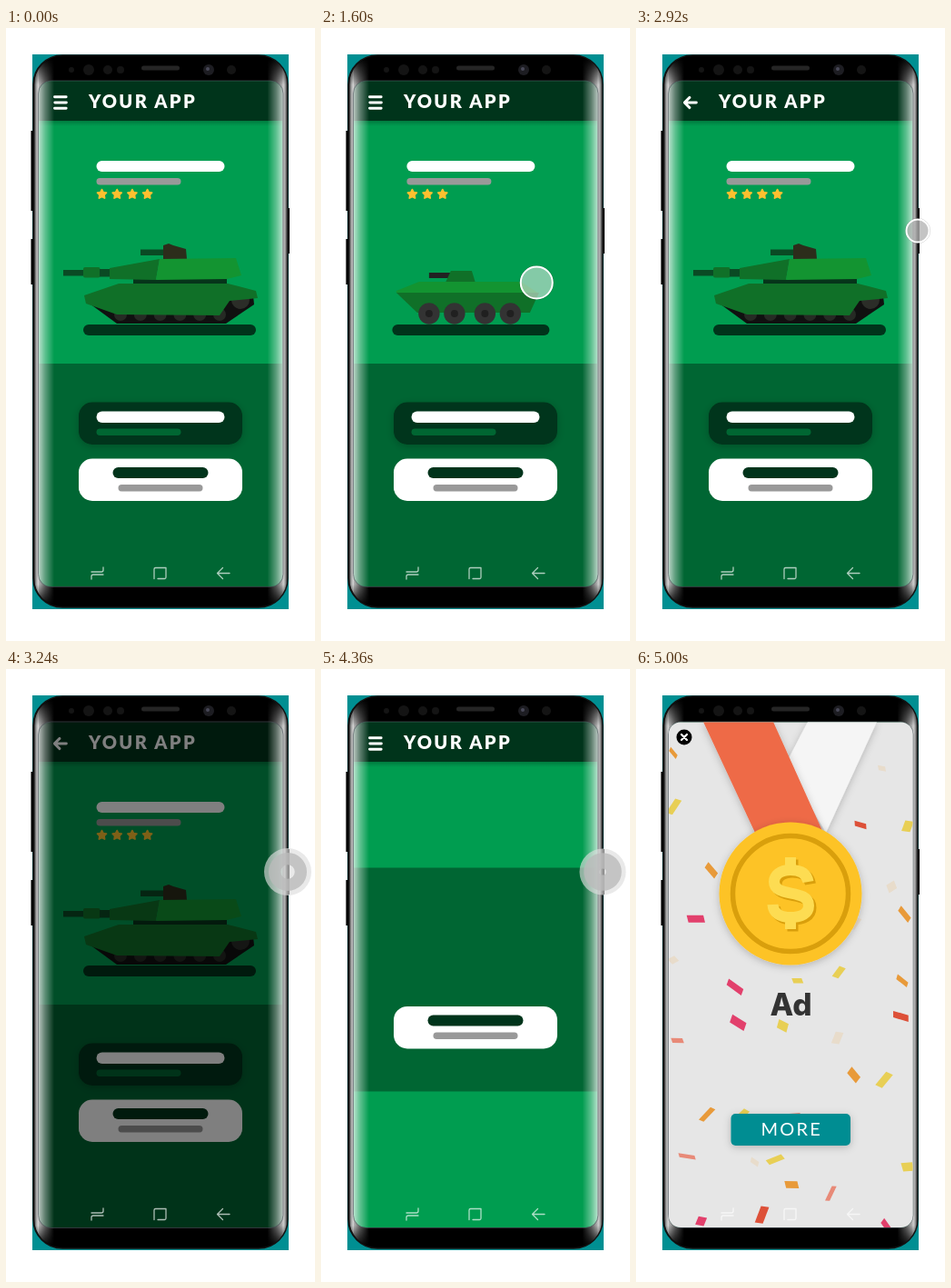
Write an HTML page that moves like this. It is 340 px wide and 674 px high and loops after 8000 ms.

```html
<!DOCTYPE html>
<html lang="en">
<head>
<meta charset="utf-8">
<title>App demo</title>
<style>
  html, body { margin: 0; width: 100%; height: 100%; overflow: hidden; background: #fff; }
  svg { display: block; width: 340px; height: 674px; }
  .title { font: 900 20px Lato, sans-serif; letter-spacing: 2.3px; fill: #fff; }
  .line { fill: none; stroke: #fff; stroke-linecap: round; stroke-linejoin: round; }
</style>
</head>
<body>
<svg viewBox="0 0 340 674">
  <defs>
    <clipPath id="screen"><rect x="36" y="58.5" width="268.5" height="555.5" rx="13"/></clipPath>
    <clipPath id="body"><rect x="31" y="31" width="278.5" height="605" rx="31"/></clipPath>
    <linearGradient id="glow">
      <stop offset="0" stop-color="#fff" stop-opacity=".72"/>
      <stop offset=".4" stop-color="#fff" stop-opacity=".38"/>
      <stop offset="1" stop-color="#fff" stop-opacity="0"/>
    </linearGradient>
    <linearGradient id="rim">
      <stop offset="0" stop-color="#222"/>
      <stop offset=".4" stop-color="#999"/>
      <stop offset="1" stop-color="#ddd"/>
    </linearGradient>
    <linearGradient id="ends" x2="0" y2="1">
      <stop offset="0" stop-color="#000"/>
      <stop offset=".05" stop-color="#fff"/>
      <stop offset=".96" stop-color="#fff"/>
      <stop offset="1" stop-color="#000"/>
    </linearGradient>
    <mask id="fade"><rect x="28" y="32" width="284" height="604" fill="url(#ends)"/></mask>
    <linearGradient id="shade" x2="0" y2="1">
      <stop offset="0" stop-opacity=".22"/>
      <stop offset="1" stop-opacity="0"/>
    </linearGradient>
    <filter id="soft" x="-20%" y="-30%" width="140%" height="170%">
      <feDropShadow dx="0" dy="2" stdDeviation="4" flood-opacity=".22"/>
    </filter>
    <g id="side">
      <rect x="31" y="34" width="5" height="602" fill="url(#rim)"/>
      <rect x="36" y="34" width="17" height="602" fill="url(#glow)"/>
    </g>
    <path id="dollar" fill="none" stroke-width="12" d="M189.500 234C188 225 181 221 170 221C158 221 152 227 152 234
      C152 252 190 241 190 260C190 269 182 273 170 273C158 273 151 268 150.500 259M170 207V222M170 272V286"/>
  </defs>

  <rect x="29" y="29" width="282" height="610" fill="#008f92"/>
  <path d="M27.5 113h3v88h-3zM27.5 232h3v50h-3zM309 198h3v50h-3z"/>
  <rect x="30" y="30" width="280" height="607" rx="32" stroke="#111" stroke-width="1.5"/>
  <rect x="149" y="41.5" width="42" height="5" rx="2.5" fill="#252525"/>
  <g fill="#141414">
    <circle cx="72" cy="46" r="3"/><circle cx="91" cy="46" r="6"/><circle cx="112" cy="46" r="5"/>
    <circle cx="126" cy="46" r="4"/><circle cx="248" cy="46" r="5"/><circle cx="223" cy="46" r="6" fill="#1d1d22"/>
    <circle cx="222" cy="45" r="2" fill="#484858"/>
  </g>

  <g clip-path="url(#screen)">
    <g id="app">
      <rect x="35" y="58" width="270" height="557" fill="#009d50"/>
      <rect id="panel" x="35" y="369" width="270" height="246" fill="#006633"/>
      <g id="items"></g>
      <g id="card1" filter="url(#soft)"></g>
      <g id="card2"></g>
      <rect x="35" y="102" width="270" height="6" fill="url(#shade)"/>
      <rect x="35" y="58" width="270" height="44" fill="#00341b"/>
      <path id="icon" class="line" stroke-width="2.9"/>
      <text class="title" x="91" y="88">YOUR APP</text>
    </g>
  </g>

  <g clip-path="url(#body)"><g mask="url(#fade)">
    <use href="#side"/>
    <use href="#side" transform="matrix(-1 0 0 1 340.5 0)"/>
  </g></g>
  <rect x="35.5" y="58" width="269.5" height="556.5" rx="14" fill="none" stroke="#4b555b" stroke-opacity=".65"/>

  <g id="ad" clip-path="url(#screen)">
    <rect x="35" y="58" width="270" height="557" fill="#e6e6e6"/>
    <g id="confetti"></g>
    <path d="M189 58H265L209 180 165 104z" fill="#f5f5f5" filter="url(#soft)"/>
    <path d="M74 58H151L206 180H131z" fill="#ee6a46" filter="url(#soft)"/>
    <circle cx="170" cy="247" r="78.5" fill="#fdc328" filter="url(#soft)"/>
    <circle cx="170" cy="247" r="63.5" fill="none" stroke="#d99f0c" stroke-width="5.5"/>
    <use href="#dollar" x="2.5" y="2.5" stroke="#d99f0c"/>
    <use href="#dollar" stroke="#fddc52"/>
    <text x="170.500" y="381" text-anchor="middle" font-family="Inter, sans-serif" font-weight="800" font-size="33.500" fill="#333">Ad</text>
    <rect x="104.500" y="489" width="131.500" height="35" rx="5" fill="#008d92" filter="url(#soft)"/>
    <text x="137.500" y="513" font-family="Lato, sans-serif" font-size="20" letter-spacing="2.2" fill="#fff">MORE</text>
    <circle cx="53" cy="75" r="8.500"/>
    <path class="line" stroke-width="2.200" d="M50 72l6 6m0-6l-6 6"/>
  </g>

  <g class="line" stroke-width="1.300" opacity=".68">
    <path d="M94 598h11q2 0 2-2v-3M107 601H96q-2 0-2 2v3"/>
    <path d="M163 605.500V595q0-1.500 1.500-1.500H176V604q0 1.500-1.500 1.500H167"/>
    <path d="M246 599.500H233m5.500-6l-6 6 6 6"/>
  </g>

  <g id="ripple">
    <circle id="halo" cx="310" cy="223" r="26" fill="#ddd"/>
    <circle id="ring" cx="310" cy="223" fill="none" stroke="#bbb" stroke-opacity=".8"/>
  </g>
  <g id="pointer">
    <circle id="edge" fill="none" stroke="#000" stroke-opacity=".18"/>
    <circle id="dot" stroke="#fff" stroke-width="2"/>
  </g>
</svg>
<script>
const $ = id => document.getElementById(id);
const set = (el, attrs) => { for (const k in attrs) el.setAttribute(k, attrs[k]); };
const clamp = v => Math.min(1, Math.max(0, v));
const lerp = (a, b, p) => a + (b - a) * p;
const part = (t, from, to) => clamp((t - from) / (to - from));
const out = p => 1 - Math.pow(1 - p, 4.67);
const inOut = p => p * p * (3 - 2 * p);
const repeat = (n, fn) => Array.from({ length: n }, (_, i) => fn(i)).join('');

const bar = (x, y, w, h, fill, r = h / 2) =>
  `<rect x="${x}" y="${y}" width="${w}" height="${h}" rx="${r}" fill="${fill}"/>`;
const poly = (points, fill) => `<polygon points="${points}" fill="${fill}"/>`;
const disc = (x, y, r, fill) => `<circle cx="${x}" cy="${y}" r="${r}" fill="${fill}"/>`;
const wheels = (n, x, gap, y, r, fill) => repeat(n, i => disc(x + i * gap, y, r, fill));

function star(x) {
  const points = repeat(10, i => {
    const a = i * Math.PI / 5, r = i % 2 ? 2.6 : 5.2;
    return `${x + r * Math.sin(a)},${182.8 - r * Math.cos(a)} `;
  });
  return `<polygon points="${points}" fill="#fdc02f" stroke="#fdc02f" stroke-width="1.8" stroke-linejoin="round"/>`;
}

const item = (stars, x, width, art) => `<g>
  ${bar(99.5, 146, 141, 12, '#fff')}${bar(99.5, 165, 93, 7.5, '#999')}
  ${repeat(stars, i => star(105.5 + i * 16.7))}${bar(x, 326, width, 12, '#00341b')}${art}</g>`;

const [light, mid, deep, dark] = ['#139431', '#107028', '#0a4a24', '#06351a'];

const heavy =
  poly('92,303 122,325 242,325 273,304 272,294', '#101010') +
  wheels(6, 126, 21.8, 315, 7, '#262a24') + disc(258, 299, 10, '#2b2d28') +
  bar(63, 266, 24, 6.5, deep, 0) + bar(85, 263, 18.5, 11.5, mid, 2) + bar(103, 265, 12, 8.5, deep, 0) +
  bar(148, 243.5, 27, 6.5, deep, 0) + poly('173,239 179,237 184,239 198,243 199,254 173,254', '#2c2d1b') +
  bar(140, 276, 103, 6, dark, 0) +
  poly('114,264 169,254 165,277 114,276', mid) + poly('169,254 253,253 259,272 243,276 165,277', light) +
  poly('86,294 124,281 244,281 275,289 277,297 246,300 235,316 122,315 88,303', mid);

const tracked =
  poly('102,301 287,301 259,326 134,326', '#333') + wheels(6, 135, 23, 311, 9, '#1e1e1e') +
  bar(165, 243.5, 20, 4.5, '#333', 0) + bar(182, 240, 24, 11, '#3a3a3a', 3) + bar(187, 249, 14, 6, '#333', 0) +
  bar(58, 268, 60, 7, mid, 0) +
  poly('86,283 162,282 294,279 299,302 90,302', mid) + poly('115,281 124,266 164,262 159,282', mid) +
  poly('162,263 181,254 222,255 268,259 274,272 243,278 159,282', light) +
  poly('160,281 243,277 243,279.5 160,284', dark);

const axles = r => fill => wheels(2, 124, 28, 314, r, fill) + wheels(2, 185.5, 28, 314, r, fill);
const wheeled =
  bar(124, 269, 24, 6, '#222', 0) + poly('142,280 148,267 171,267 175,280', mid) +
  poly('88,291 88,289 113,279 225,279 245,292', light) + poly('88,291 245,291 235,313 111,313', mid) +
  axles(11.7)('#333') + axles(4)('#202020');

$('items').innerHTML = item(4, 85, 190, heavy) + item(5, 57, 226, tracked) + item(3, 83.5, 173, wheeled);
$('card1').innerHTML = bar(80, 411.5, 180, 46.5, '#00341b', 15) + bar(99.5, 421.5, 141, 12.5, '#fff') + bar(99.5, 440.5, 93, 7.5, '#006633');
$('card2').innerHTML = bar(80, 473.5, 180, 46.5, '#fff', 15) + bar(117.5, 483, 105, 12, '#00341b') + bar(123.5, 502, 93, 7.5, '#999');

let seed = 11;
const rand = (a, b) => {
  seed = seed * 16807 % 2147483647;
  return lerp(a, b, seed / 2147483647);
};
const tints = ['#dd5038', '#e2406c', '#e89a3a', '#e8cf55', '#e8dccb', '#e88a78'];

// One flake per cell of a loose 5 by 9 grid
$('confetti').innerHTML = repeat(45, i => {
  const x = 63 + i % 5 * 54 + rand(-22, 22), y = 95 + Math.floor(i / 5) * 62 + rand(-24, 24);
  const w = rand(5, 11), h = rand(2, 5), angle = rand(-70, 70), fill = tints[Math.floor(rand(0, 6))];
  if (Math.abs(x - 170) < 35 && Math.abs(y - 369) < 22) return '';
  return `<path d="M${-w} ${-h}H${w - 2}L${w} ${h}H${2 - w}z" fill="${fill}" transform="translate(${x} ${y}) rotate(${angle})"/>`;
});

// start, length; each swipe brings in the next item
const swipes = [[640, 440], [1400, 350], [2160, 520]];
const presses = [2920, 4160];
const drops = { card2: 4233, panel: 4258, card1: 4365, items: 4390 };

function drawItems(t) {
  const at = [0];
  swipes.forEach(([start, length], i) => {
    if (t < start) return;
    const e = out(part(t, start, start + length));
    at.length = 0;
    if (e < 1) at[i] = 345 * e;
    at[(i + 1) % 3] = 276 * (e - 1);
  });
  [...$('items').children].forEach((g, i) => set(g, {
    transform: `translate(${at[i] || 0} 0)`, visibility: at[i] === undefined ? 'hidden' : 'visible'
  }));
}

// Three bars fold into a back arrow
function drawIcon(t) {
  const p = t < 4100 ? inOut(part(t, 2180, 2480)) : 0;
  const x1 = 53.5, x2 = lerp(66.2, 59, p), a = lerp(6.2, .2, p), b = lerp(6.2, 5.6, p);
  set($('icon'), { d: `M${x1} ${82 - a}L${x2} ${82 - b}M53.8 82H66.4M${x1} ${82 + a}L${x2} ${82 + b}` });
}

// Quick pull to the right, slower way back
function drag(t) {
  const there = part(t, 0, 120), back = part(t, 120, 400);
  const x = 170 + 121 * (back ? Math.pow(1 - back, 1.72) : there);
  return [x, 280, 18 - 5 * (there - part(t, 120, 200))];
}

function pointerAt(t) {
  if (t < 40) return null;
  if (t < 640) return [170, lerp(559, 280, inOut(part(t, 40, 480))), 18];
  if (t < 2160) return drag(t - swipes[t < 1400 ? 0 : 1][0]);
  const press = presses.find(s => t < s + 70);
  if (!press || (t > 2990 && t < 4000)) return null;
  const p = inOut(part(t, 2180, 2700));
  return [lerp(170, 310, p), lerp(280, 223, p), lerp(18, 13, part(t, press - 40, press))];
}

function drawPointer(t) {
  const p = pointerAt(t);
  set($('pointer'), { visibility: p ? 'visible' : 'hidden' });
  if (p) {
    const [cx, cy, r] = p;
    set($('dot'), { cx, cy, r: r - .5, fill: cx > 300 ? 'rgba(180,180,180,.78)' : 'rgba(220,232,226,.6)' });
    set($('edge'), { cx, cy, r: r + .7 });
  }
  const start = presses.find(s => t >= s + 70 && t < s + 640);
  set($('ripple'), { visibility: start ? 'visible' : 'hidden' });
  if (!start) return;
  const q = part(t, start, start + 600), grow = out(clamp(q * 1.5));
  const outer = lerp(14, 21, grow), inner = outer * Math.pow(q, 1.6);
  set($('halo'), { r: lerp(14, 26, grow), 'fill-opacity': .65 * (1 - part(q, .75, 1)) });
  set($('ring'), { r: (outer + inner) / 2, 'stroke-width': outer - inner });
}

function draw(t) {
  drawItems(t);
  drawIcon(t);
  drawPointer(t);
  for (const id in drops) {
    const y = t < 4100 ? 0 : 560 * (out(part(t, drops[id], drops[id] + 420)) - 1);
    set($(id), { transform: `translate(0 ${y})` });
  }
  set($('app'), { opacity: t < 4000 ? 1 - part(t, 2960, 3520) : part(t, 4150, 4310) });
  set($('ad'), { visibility: t >= 5000 ? 'visible' : 'hidden' });
}

function tick() {
  draw(performance.now() % 8000);
  requestAnimationFrame(tick);
}
tick();
</script>
</body>
</html>
```
